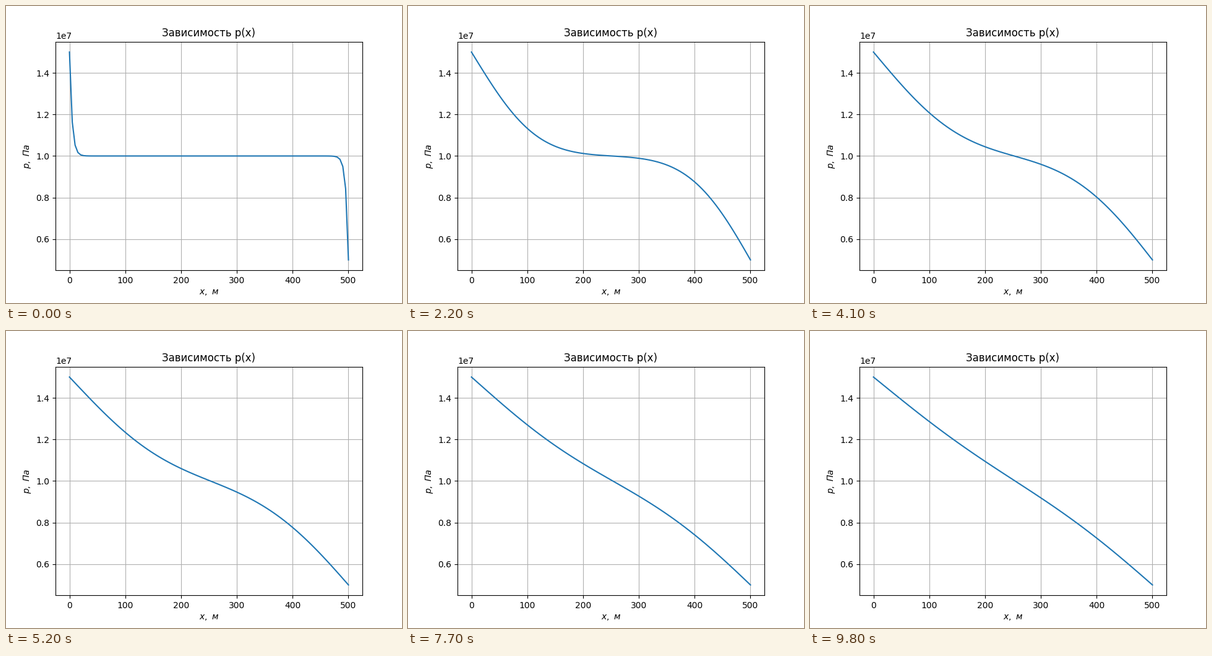
Recreate the animation shown at these times as a matplotlib script. Size 640 by 480 pixels, loop 9.9 s.

```python
import numpy as np
import matplotlib.pyplot as plt
from matplotlib.animation import FuncAnimation

LENGTH = 500.0          # m
NODES = 100
P_LEFT, P_START, P_RIGHT = 15e6, 10e6, 5e6   # Pa
DIFFUSION = 17.7        # m^2 per time step
COMPRESS = 1.1e-8       # 1/Pa
FRAMES = 99
STEPS_PER_FRAME = 10

x = np.linspace(0, LENGTH, NODES)
ratio = DIFFUSION / (x[1] - x[0]) ** 2


def step(p):
    """One implicit step of filtration with pressure-dependent density."""
    density = 1 + COMPRESS * (p - P_START)
    flow = ratio * (density[:-1] + density[1:]) / 2
    matrix = np.eye(NODES)
    i = np.arange(1, NODES - 1)
    matrix[i, i - 1] = -flow[:-1]
    matrix[i, i] += flow[:-1] + flow[1:]
    matrix[i, i + 1] = -flow[1:]
    return np.linalg.solve(matrix, p)


def solve():
    p = np.full(NODES, P_START)
    p[0], p[-1] = P_LEFT, P_RIGHT
    p = step(p)
    profiles = [p]
    while len(profiles) < FRAMES:
        for _ in range(STEPS_PER_FRAME):
            p = step(p)
        profiles.append(p)
    return profiles


profiles = solve()

plt.rcParams["font.family"] = "DejaVu Sans"
fig, ax = plt.subplots(figsize=(6.4, 4.8), dpi=100)
line, = ax.plot(x, profiles[0], color="#1f77b4", lw=1.5)
ax.set_title("Зависимость p(x)")
ax.set_xlabel(r"$x,\ м$")
ax.set_ylabel(r"$p,\ Па$")
ax.set_xlim(-25, 525)
ax.set_ylim(4.5e6, 15.5e6)
ax.grid(True)


def update(frame):
    line.set_ydata(profiles[frame])
    return line,


anim = FuncAnimation(fig, update, frames=FRAMES, interval=100,
                     repeat=True, repeat_delay=0)
plt.show()
```
